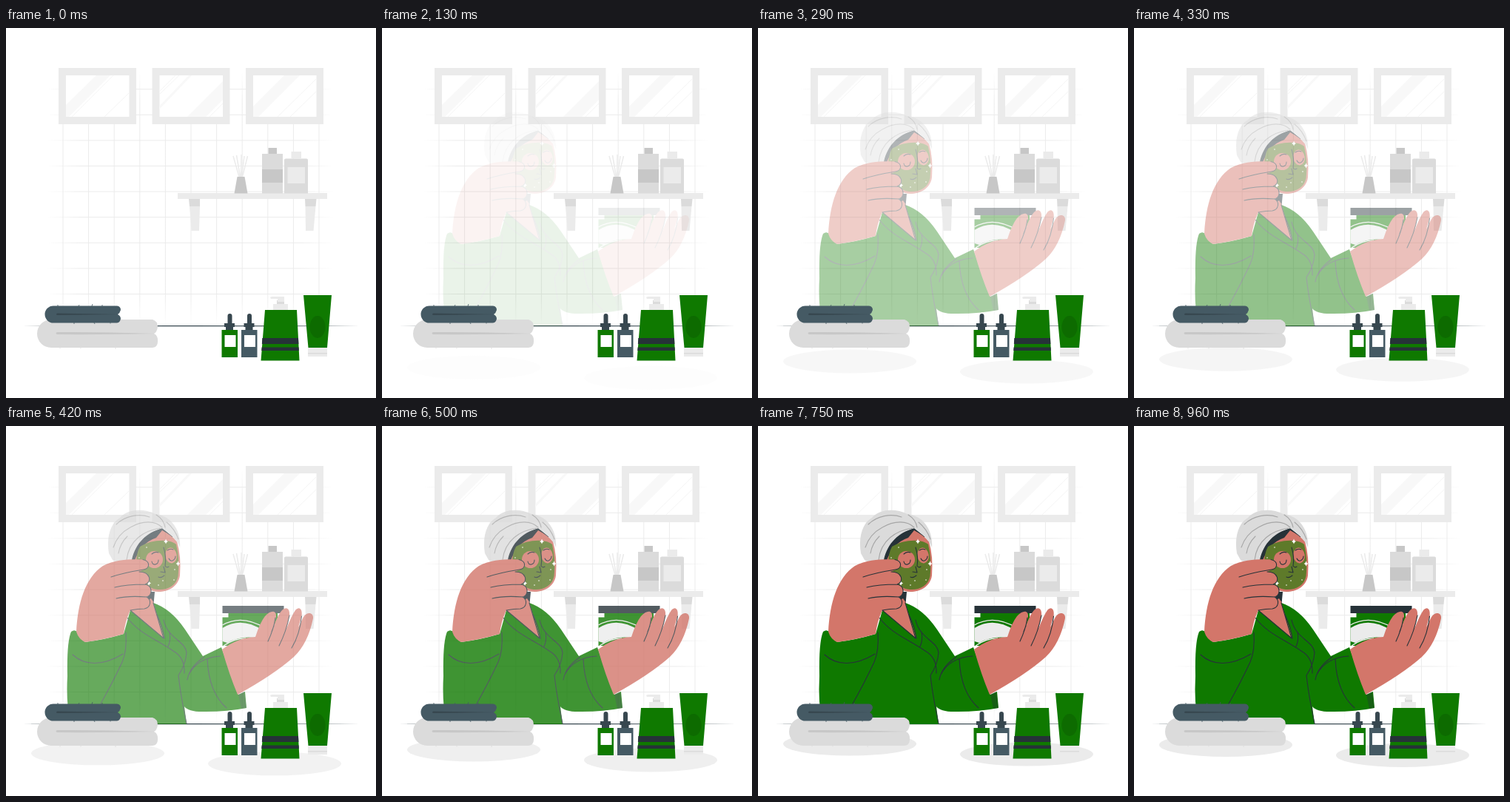
Write an HTML page that moves like this. It is 500 by 500 pixels and loops after 1.04 s.

```html
<!DOCTYPE html>
<html lang="en">
<head>
<meta charset="utf-8">
<title>Skin care</title>
<style>
  html, body { margin: 0; height: 100%; overflow: hidden; background: #fff; }
  svg { display: block; width: 100vw; height: 100vh; }
  .g { fill: #0f7900; }
  .d { fill: #263238; }
  .n { fill: #37474f; }
  .b { fill: #455a64; }
  .s { fill: #d3766a; }
  .l { fill: #ebebeb; }
  .m { fill: #dbdbdb; }
  .k { fill: #c7c7c7; }
  .line { fill: none; stroke: #263238; stroke-width: 1.1; stroke-linecap: round; stroke-linejoin: round; }
</style>
</head>
<body>
<svg viewBox="0 0 500 500">
  <defs>
    <linearGradient id="fadeX" gradientUnits="userSpaceOnUse" x1="55" x2="443">
      <stop stop-color="#ebebeb" stop-opacity="0"/><stop offset=".12" stop-color="#ebebeb"/>
      <stop offset=".88" stop-color="#ebebeb"/><stop offset="1" stop-color="#ebebeb" stop-opacity="0"/>
    </linearGradient>
    <linearGradient id="fadeY" gradientUnits="userSpaceOnUse" x1="0" x2="0" y1="60" y2="402">
      <stop stop-color="#ebebeb" stop-opacity="0"/><stop offset=".12" stop-color="#ebebeb"/>
      <stop offset=".88" stop-color="#ebebeb"/><stop offset="1" stop-color="#ebebeb" stop-opacity="0"/>
    </linearGradient>
    <g id="mirror">
      <path class="l" d="M0 0H105V76H0z"/>
      <path fill="#fff" d="M10 10H95.500V66H10z"/>
    </g>
    <g id="dropper">
      <path class="n" d="M299.500 399V389q0-3 3-3t3 3V399H309V404H307V408H297V404H295V399z"/>
      <path d="M291.500 408H313V445H291.500z"/>
      <path fill="#fff" d="M295.500 415H310.500V431H295.500z"/>
    </g>
    <path id="spark" fill="#fff" d="M0-3.500Q.5-.5 3 0Q.5.5 0 3.500Q-.5.5-3 0Q-.5-.5 0-3.500z"/>
  </defs>

  <path id="cols" stroke="url(#fadeY)"/>
  <path id="rows" stroke="url(#fadeX)"/>

  <!-- mirrors -->
  <use href="#mirror" x="71" y="54"/>
  <use href="#mirror" x="197.500" y="54"/>
  <use href="#mirror" x="324" y="54"/>
  <path fill="#f8f8f8" d="M81 104L122 64H141L85 120H81zM207 106L247 64H251L207 110zM245 120L293 72V97L270 120zM334 106L376 64H397L341 120H334z"/>
  <path stroke="#f5f5f5" d="M133 120L166 88M89 120L145 64M207 86L229 64M207 90L234 64M275 120L293 102M367 120L420 68M384 120L420 85"/>

  <!-- shelf -->
  <path class="l" d="M232 223H434V231H232zM248 241H262L261 274H250.500zM404.500 241H418.500L415.500 274H405z"/>
  <path class="m" d="M247 231H262V241H248zM404 231H419.500L418.500 241H404.500z"/>
  <path fill="none" stroke="#ebebeb" stroke-width="1.500" d="M315 201L307 173M316.500 201L311.500 172M317.500 201L318 171M318.500 201L322 173M319.500 201L326.500 173"/>
  <path class="k" d="M312.500 201H322.500L326.500 223.500H308.500zM354.500 162H366V170H354.500z"/>
  <path class="m" d="M346 170H374V223.500H346zM378 176.500H406q2 0 2 2V223.500H376V178.500q0-2 2-2z"/>
  <path class="k" d="M346 191H374V209H346z"/>
  <path class="l" d="M385.500 167H399V176.500H385.500zM380.500 188H404V210H380.500z"/>

  <!-- table edge -->
  <path class="n" d="M22 402.700Q130 401.800 250 401.900T478 402.700Q370 403.300 250 403.300T22 402.700z"/>

  <g id="woman" opacity="0">
    <!-- robe and chest -->
    <path class="d" d="M194 224H201L199 246L188 240z"/>
    <path class="s" d="M168 249L196 233L200 239L216 289L190 275z"/>
    <path class="g" d="M88 278Q93 274 97 279Q101 289 107 292Q132 289 159 281L168 249L214 287L199 239Q223 247 242 275L266 311L291 299L314 363L323 359L325 381Q300 386 270 386Q247 387 241 379L244 403H87Q81 374 83 338Q82 292 88 278z"/>
    <path class="d" opacity=".35" d="M322 359L325 381L318 382L314 363z"/>
    <path class="line" d="M168 249L213 287L199 239M163 258C180 281 205 289 226 304Q242 313 241 334M213 262C218 287 242 290 244 306Q243 322 233 337Q235 355 239 377L244 402M214 287Q212 272 204 255M221 278Q223 290 219 298M90 309C106 324 130 325 158 308M162 279C163 295 161 310 157 319Q144 347 127 377M268 312C256 320 247 331 245 343M247 336Q259 313 290 311M272 315Q274 360 298 381"/>

    <!-- head -->
    <path class="d" d="M169 184C168 158 187 145 211 138L226 150L205 158L184 190z"/>
    <path class="s" d="M211 141Q224 148 231 156Q237 176 235 202C233 217 219 224 206 224C186 223 174 207 173 184Q182 158 203 151z"/>
    <path fill="#5e7a2a" d="M181 163C196 153 221 152 230 160Q235 181 232.500 203C230 216 218 222 205 221C187 219 177 204 176 186Q176 172 181 163z"/>
    <ellipse class="s" cx="200.500" cy="180.500" rx="11.500" ry="11.500"/>
    <ellipse class="s" cx="223" cy="175" rx="7.800" ry="10.500" transform="rotate(-8 223 175)"/>
    <path class="line" d="M213 164Q217 178 215 189Q217 192 220 190M213 190L215 198L209 197M197 183Q198 188 202 187Q206 186 206 181M220 179Q222 183 225 182Q229 180 229 176M206 204Q209 206 214 202"/>
    <path class="line" stroke-width="2" d="M197 173Q201 169 206 171M218 168Q222 165 226 167"/>
    <use href="#spark" x="216" y="156"/>
    <use href="#spark" x="232.500" y="186"/>
    <use href="#spark" x="193" y="212.500"/>
    <path stroke="#fff" stroke-width="1.600" stroke-linecap="round" d="M206 215h0M180 178h0M190 164h0M228 194h0M227 208h0M212 209h0M185 202h0"/>
    <path class="m" d="M139 172C135 147 143 130 154 124C164 112 186 111 202 119C223 121 237 141 235 164Q230 151 211 138C190 144 175 158 170 181Q160 190 144 181z"/>
    <path class="line" stroke="#a6a6a6" style="stroke:#a6a6a6" d="M211 137C202 128 185 127 168 137Q151 146 145 164M209 138C187 141 166 154 163 181M203 120Q213 126 215 137M194 123C180 118 161 121 149 133M217 130Q228 139 233 153M152 172Q154 159 164 149"/>

    <!-- raised hand -->
    <path class="s" d="M95 278C97 239 107 205 131 189C148 180 170 180 185 180.500C196 183 194 193 186 194L180 197C195 197 198 211 188 214C199 216 198 229 190 231C197 235 196 245 187 247Q180 249 168 249Q161 264 159 281Q131 289 107 292Q98 288 95 278z"/>
    <path class="line" d="M185 180.500C196 183 194 193 186 194Q160 198 142 204M180 197C195 197 198 211 188 214Q163 214 147 218M188 214C199 216 198 229 190 231Q165 229 149 233M190 231C197 235 196 245 187 247Q178 247 168 249"/>

    <!-- jar -->
    <path class="g" d="M300.500 253H367V258.500H371V297H292.500V258.500H300.500z"/>
    <path class="d" d="M292.500 243H375.500V253H292.500z"/>
    <path class="l" d="M292.500 273Q318 257 347 276V288Q320 281 299 293L292.500 291z"/>
    <path fill="none" stroke="#ebebeb" stroke-width="1.300" d="M292.500 269Q319 254 350 273M294 297Q308 287 324 287"/>

    <!-- open hand -->
    <path class="s" d="M292 302Q313 286 337 285Q343 266 350 257C358 248 366 249 365 258L362 270Q368 254 373 249C379 243 384 247 383 256L379 274Q386 256 391 249C396 243 401 247 399.500 257L395 272L402 258C407 250 416 252 415 260Q408 294 389 312Q362 336 313 363Q302 337 292 302z"/>
    <path class="line" d="M364 259Q362 274 354 291M362 270L359 278M383 256Q379 277 369 297M399.500 257Q397 282 386 300"/>
  </g>

  <g id="shadows" class="l" opacity="0">
    <ellipse cx="124" cy="431.300" rx="90" ry="16"/>
    <ellipse cx="363" cy="445.300" rx="90" ry="16"/>
  </g>

  <!-- towels -->
  <path class="m" d="M61 394H198Q205 396 205 404Q204 411 200 413Q206 416 205 424Q205 431 198 432H61A19 19 0 0 1 61 394z"/>
  <path class="k" d="M69 411Q130 410.500 201 413Q130 414.500 69 414q-3-1.500 0-3z"/>
  <path class="b" d="M64 375.500H150Q155 376 155 381Q154 385 151 387Q155 389 155 393Q154 398 150 398.500H64A11.500 11.500 0 0 1 64 375.500z"/>
  <path class="n" d="M69 385.500L153 387L69 388q-2-1.200 0-2.500z"/>
  <path stroke="#455a64" stroke-width=".8" d="M70 376v-2M98 376l1-2M116 376l1-3M130 376v-2M92 398v2M119 398l1 2M141 398v1.500"/>
  <path stroke="#dbdbdb" stroke-width=".8" d="M73 432v1.500M101 432v1.500M148 432v2"/>

  <!-- bottles -->
  <use href="#dropper" class="g"/>
  <use href="#dropper" class="b" x="26.500"/>
  <path class="m" d="M366 368H376V374H366z"/>
  <path class="l" d="M357 364Q358 363 360 363H376V370H367V366H358zM361 373H381V381H361z"/>
  <path class="g" d="M350 381H393L396.500 449.500H344.500zM402 361H440L434 432H408.500z"/>
  <path class="d" d="M346.300 419H395L395.400 427H345.900zM345.600 431.500H395.600L395.800 436H345.300z"/>
  <ellipse cx="421" cy="404" rx="10.500" ry="15" fill="#0d6b00"/>
  <path class="l" d="M408 432H434V444H408z"/>
  <path class="m" d="M408 439H434V440.500H408z"/>
</svg>
<script>
  const LOOP = 1040, FPS = 24;
  const $ = id => document.getElementById(id);
  let cols = "", rows = "";
  for (let i = 0; i < 11; i++) cols += `M${77 + i * 34.6} 60V402`;
  for (let i = 0; i < 9; i++) rows += `M55 ${82.7 + i * 34.6}H443`;
  $("cols").setAttribute("d", cols);
  $("rows").setAttribute("d", rows);

  // cubic-bezier(.36, -.01, .5, 1.38): overshoots, then settles
  function ease(x) {
    if (x >= 1) return 1;
    const bez = (a, b, s) => 3 * a * s * (1 - s) ** 2 + 3 * b * s * s * (1 - s) + s ** 3;
    let lo = 0, hi = 1;
    for (let i = 0; i < 24; i++) {
      const mid = (lo + hi) / 2;
      if (bez(.36, .5, mid) < x) lo = mid; else hi = mid;
    }
    return bez(-.01, 1.38, lo);
  }

  const start = performance.now();
  function draw(now) {
    const t = Math.max(0, now - start) % LOOP;
    const step = Math.floor((t + 5) * FPS / 1000);
    const e = step < 2 ? 0 : ease((step + .65) / FPS);
    const alpha = Math.min(1, Math.max(0, e));
    $("woman").setAttribute("opacity", alpha);
    $("shadows").setAttribute("opacity", alpha);
    $("shadows").setAttribute("transform", `translate(0 ${30 * (1 - e)})`);
    requestAnimationFrame(draw);
  }
  draw(start);
</script>
</body>
</html>
```
